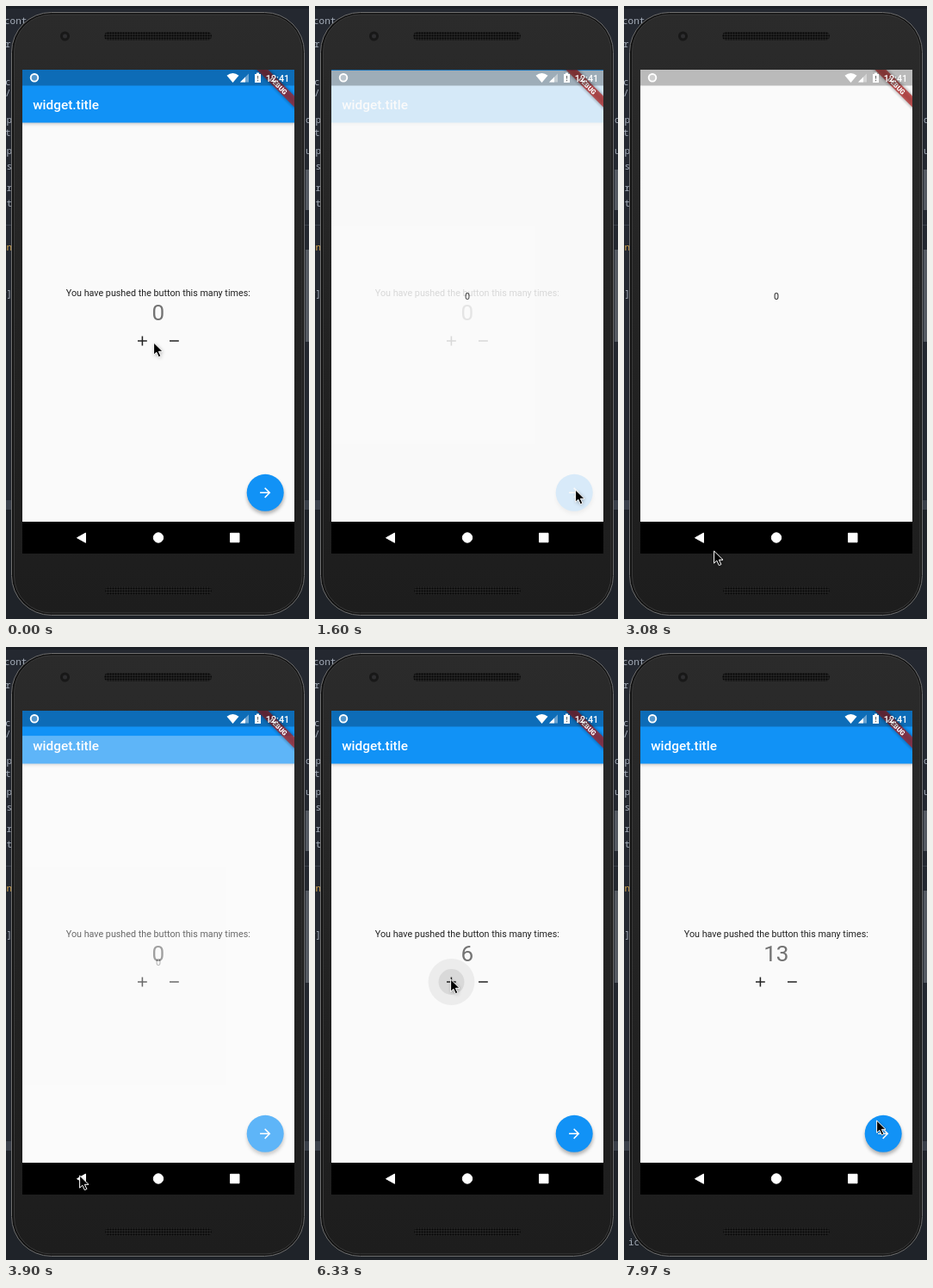
These frames come from a looping animation (352 px wide and 712 px high, 8000 ms). An HTML page:

```html
<!DOCTYPE html>
<html lang="en">
<head>
<meta charset="utf-8">
<title>Counter app</title>
<style>
  html, body { margin: 0; width: 100%; height: 100%; overflow: hidden; background: #242830; }
  svg { display: block; width: 352px; height: 712px; font-family: Roboto, sans-serif; }
  .code { font: 11px "Noto Sans Mono", monospace; fill: #a4acb8; }
  .mid { text-anchor: middle; }
  .body { font-size: 10.75px; fill: #000; fill-opacity: .87; }
</style>
</head>
<body>
<svg viewBox="0 0 352 712">
  <defs>
    <linearGradient id="shell" x1="0" y1="0" x2="0" y2="1">
      <stop offset="0" stop-color="#2b2b2b"/>
      <stop offset=".5" stop-color="#232323"/>
      <stop offset="1" stop-color="#1d1d1d"/>
    </linearGradient>
    <pattern id="mesh" width="3" height="3" patternUnits="userSpaceOnUse">
      <rect width="3" height="3" fill="#242424"/>
      <circle cx="1.5" cy="1.5" r="1.1" fill="#050505"/>
    </pattern>
    <filter id="soft" x="-30%" y="-30%" width="160%" height="160%">
      <feGaussianBlur stdDeviation="2"/>
    </filter>
    <clipPath id="view"><rect x="19" y="74" width="316" height="525"/></clipPath>
  </defs>

  <!-- editor behind the phone -->
  <rect width="352" height="712" fill="#242830"/>
  <rect width="352" height="3" fill="#1c2026"/>
  <rect y="254" width="352" height="1" fill="#3b414b"/>
  <rect y="574" width="352" height="11" fill="#3a404a"/>
  <rect y="585" width="352" height="127" fill="#1f2329"/>
  <rect x="348" y="190" width="4" height="47" fill="#555a62"/>
  <rect x="348" y="283" width="4" height="107" fill="#555a62"/>
  <g class="code">
    <text x="-2" y="21">cont</text>
    <text x="-1" y="48">r</text>
    <text x="-1" y="92">c</text>
    <text x="-1" y="105">/</text>
    <text x="-6" y="136">ep</text>
    <text x="-1" y="151">t</text>
    <text x="-6" y="172">ep</text>
    <text x="-6" y="190">is</text>
    <text x="-6" y="215">er</text>
    <text x="-6" y="233">nt</text>
    <text x="-6" y="284" fill="#d9a84e">on</text>
    <text x="-6" y="338">r]</text>
    <text x="348" y="136">d</text>
    <text x="348" y="172">u</text>
    <text id="log" x="5" y="695">ic</text>
  </g>

  <!-- phone -->
  <rect x="6.5" y="7.5" width="340" height="700" rx="46" fill="#121212" stroke="#707070"/>
  <rect x="9.5" y="10" width="334.5" height="695" rx="43" fill="url(#shell)" stroke="#3a3a3a"/>
  <circle cx="68.5" cy="35" r="5.5" fill="#181818"/>
  <circle cx="68.5" cy="35" r="2.5" fill="#2e2e30"/>
  <rect x="114" y="30" width="125" height="10" rx="5" fill="url(#mesh)"/>
  <rect x="115" y="674" width="124" height="10" rx="5" fill="url(#mesh)"/>

  <g clip-path="url(#view)">
    <!-- counter page -->
    <rect x="19" y="74" width="316" height="525" fill="#fafafa"/>
    <rect x="15" y="76" width="324" height="60.5" opacity=".25" filter="url(#soft)"/>
    <rect x="19" y="74" width="316" height="61.5" fill="#1192f6"/>
    <text x="31.2" y="119.5" font-size="15.36" font-weight="500" fill="#fff">widget.title</text>
    <g id="splash">
      <circle cx="158.5" cy="389" r="27" opacity=".055"/>
      <circle cx="158.5" cy="389" r="15" opacity=".08"/>
    </g>
    <text class="mid body" x="176.8" y="337.4">You have pushed the button this many times:</text>
    <text id="count" class="mid" x="176.8" y="364.8" font-size="26.1" fill-opacity=".54">0</text>
    <path d="M153 389h10.8M158.4 383.6v10.8M190 389h10.8" stroke="#222" stroke-width="1.54"/>
    <circle cx="301.5" cy="568.5" r="21.5" opacity=".3" filter="url(#soft)"/>
    <circle cx="301.2" cy="565.3" r="21.5" fill="#1192f6"/>
    <circle id="press" cx="301.2" cy="565.3" r="21.5" fill="#fff" opacity=".08"/>
    <path transform="translate(292 556.1) scale(.768)" fill="#fff"
      d="M12 4l-1.41 1.41L16.17 11H4v2h12.17l-5.58 5.59L12 20l8-8z"/>

    <!-- value page -->
    <g id="page">
      <rect x="19" y="74" width="316" height="525" fill="#fafafa"/>
      <text class="mid body" x="177" y="340.5">0</text>
    </g>

    <g transform="translate(335 74) rotate(45)">
      <rect x="-36" y="21.5" width="72" height="9.3" opacity=".4" filter="url(#soft)"/>
      <rect x="-50" y="21.5" width="100" height="9.3" fill="#b71c1c" opacity=".66"/>
      <text class="mid" y="29" font-size="7.85" font-weight="900" fill="#fff">DEBUG</text>
    </g>

    <!-- status bar -->
    <rect x="19" y="74" width="316" height="18.5" opacity=".26"/>
    <circle cx="33" cy="83.3" r="4.3" fill="#fff" fill-opacity=".3" stroke="#fff" stroke-width="1.9"/>
    <g fill="#fff">
      <path d="M263.500 89l-7-8.300q7-5.400 14 0z"/>
      <path d="M272 88.500h10v-10z" opacity=".4"/>
      <path d="M272 88.500h6v-6z"/>
      <path d="M289 79h2v-1.500h3V79h2v10h-7z"/>
      <text x="301.8" y="87.5" font-size="10.8" font-weight="500">12:41</text>
    </g>
    <path d="M292.500 81v3.500M292.500 85.800v1.500" stroke="#777" stroke-width="1.3"/>
  </g>

  <!-- navigation bar -->
  <rect x="19" y="599" width="316" height="37"/>
  <ellipse id="ripple" cx="88" cy="617.5" rx="30" ry="18" fill="#fff" opacity=".2"/>
  <g fill="#fff" stroke="#fff" stroke-linejoin="round">
    <path d="M82.500 617.700l10-5.600v11.200z"/>
    <circle cx="177" cy="617.5" r="5.7"/>
    <rect x="260.5" y="612.3" width="10.5" height="10.5"/>
  </g>

  <g id="cursor">
    <path d="M1.500 2V17l3.300-3 2.400 5 2.400-1-2.400-5h4.800z" opacity=".3" filter="url(#soft)"/>
    <path d="M.6 1V15.200l3.200-3 2.500 5.500 2.600-1.100-2.500-5.300h4.600z" stroke="#fff"/>
  </g>
</svg>

<script>
const LOOP = 8000, TICK = 58;
const [cursor, page, count, splash, press, ripple, log] =
  ['cursor', 'page', 'count', 'splash', 'press', 'ripple', 'log']
    .map(id => document.getElementById(id));

const clamp = v => Math.min(1, Math.max(0, v));
const easeOut = p => 1 - (1 - p) ** 2;
const show = (node, on) => node.setAttribute('visibility', on ? 'visible' : 'hidden');

// The pointer follows one curve after another: a bend, then a resting place.
const home = [171, 390];
const moves = [
  { from: 210, to: 670, bend: [230, 500], end: [302, 561] },
  { from: 1960, to: 2430, bend: [168, 425], end: [180, 339] },
  { from: 2670, to: 3360, bend: [152, 713], end: [85, 613] },
  { from: 4200, to: 4780, bend: [126, 481], end: [156, 406] },
  { from: 5010, to: 5130, bend: [156, 396], end: [157, 385] },
  { from: 7500, to: 7970, bend: [230, 490], end: [293, 549] }
];

function cursorAt(t) {
  let at = home;
  for (const { from, to, bend, end } of moves) {
    if (t < from) break;
    const last = Math.round((to - from) / TICK);
    const step = Math.floor((t - from) / (to - from) * last + .1);
    const u = easeOut(clamp((step + 1) / (last + 1)));
    at = at.map((a, i) =>
      Math.round(a * (1 - u) ** 2 + 2 * bend[i] * u * (1 - u) + end[i] * u * u));
  }
  return at;
}

// The new page fades in while it rises, and leaves the same way.
function pageAt(t) {
  const open = t < 1480 ? 0 : .5 + Math.floor((t - 1480) / 60) / 5;
  const shut = .9 - Math.floor((t - 3750) / 60) / 5;
  return clamp(Math.min(open, shut));
}

function draw(t) {
  const p = pageAt(t);
  const taps = Math.floor((t - 5580) / 150) + 1;
  cursor.setAttribute('transform', `translate(${cursorAt(t)})`);
  page.setAttribute('opacity', p ** 1.6);
  page.setAttribute('transform', `translate(0 ${131 * (1 - p) ** 2.17})`);
  count.textContent = Math.min(13, Math.max(0, taps));
  show(splash, t >= 6270 && t < 6450);
  show(press, t >= 1480 && t < 1720);
  show(ripple, t >= 3600 && t < 3870);
  show(log, t >= 7790);
}

const start = performance.now();
function tick(now) {
  draw(Math.max(0, now - start) % LOOP);
  requestAnimationFrame(tick);
}
draw(0);
requestAnimationFrame(tick);
</script>
</body>
</html>
```
